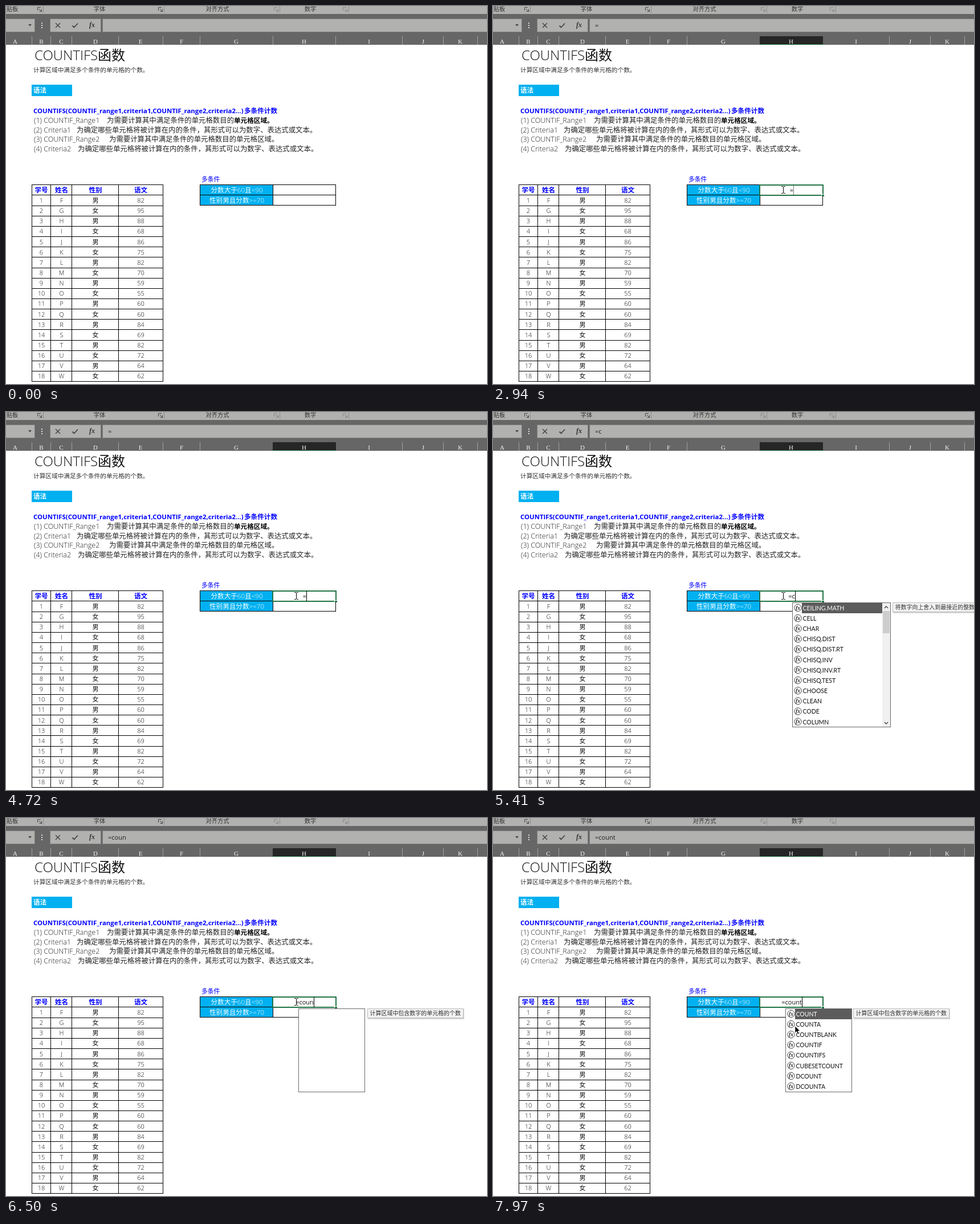
These frames come from a looping animation (844 px wide and 663 px high, 8 s). An HTML page with a canvas:

```html
<!DOCTYPE html>
<html lang="zh-CN">
<head>
<meta charset="utf-8">
<title>COUNTIFS</title>
<style>
html, body { margin: 0; width: 100%; height: 100%; overflow: hidden; background: #fff; }
canvas { display: block; width: 844px; height: 663px; }
</style>
</head>
<body>
<canvas id="stage" width="844" height="663"></canvas>
<script>
const ctx = document.getElementById('stage').getContext('2d');
const LOOP = 8000, ROW = 18.15;
const CJK = '"Noto Sans CJK SC", "Noto Sans CJK", sans-serif';
const SANS = '"Open Sans", ' + CJK;
const LIST = 'Lato, ' + CJK;
const SERIF = '"Liberation Serif", serif';
const BLUE = '#0000ff', CYAN = '#00b0f0', BAR = '#b1b1af', DARK = '#666666', GREEN = '#217346';
const TEAL = '#2cc3c6', PALE = '#74d6d8';

const COLS = [45, 78, 115, 197, 275, 340, 468, 578, 695, 767, 827];
const COL_X = [16, 62, 97, 157, 236, 308, 404, 523, 637, 732, 797];
const SCORES = [82, 95, 88, 68, 86, 75, 82, 70, 59, 55, 60, 60, 84, 69, 82, 72, 64, 62];
const COUNT_TIP = '计算区域中包含数字的单元格的个数';
const COUNT_LIST = 'COUNT COUNTA COUNTBLANK COUNTIF COUNTIFS CUBESETCOUNT DCOUNT DCOUNTA';

// Each menu: start time, left, right, items, thumb bottom (0 = no scrollbar), tip left, tip width, tip
const MENUS = [
  [5410, 525, 698, 'CEILING.MATH CELL CHAR CHISQ.DIST CHISQ.DIST.RT CHISQ.INV CHISQ.INV.RT CHISQ.TEST CHOOSE CLEAN CODE COLUMN',
    388, 701, 270, '将数字向上舍入到最接近的整数或最接近的指定基数的倍数'],
  [5570, 521, 674, 'CODE COLUMN COLUMNS COMBIN COMBINA COMPLEX CONCATENATE CONFIDENCE.NORM CONFIDENCE.T CONVERT CORREL COS',
    425, 677, 270, '返回文本字符串中第一个字符在本机所用字符集中的数字代码'],
  [5890, 518, 648, 'COUNT COUNTA COUNTBLANK COUNTIF COUNTIFS COUPDAYBS COUPDAYS COUPDAYSNC COUPNCD COUPNUM COUPPCD CUBESETCOUNT',
    511, 651, 169, COUNT_TIP],
  [6200, 515, 631, COUNT_LIST, 0, 634, 169, COUNT_TIP],
  [6500, 513, 630, '', 0, 634, 169, COUNT_TIP],
  [6580, 513, 630, COUNT_LIST, 0, 632, 169, COUNT_TIP]
];
const TYPED = [[0, ''], [2470, '='], [5410, '=c'], [5570, '=co'], [5890, '=cou'], [6200, '=coun'], [6580, '=count']];
const CARET = [[0, 0], [1300, 1], [1770, .5], [1850, 0], [2310, .5], [2390, 1], [2940, .5], [3010, 0], [3490, 1],
  [4020, .5], [4100, 0], [4350, .5], [4420, 1], [5110, .6], [5185, .3], [5260, 0], [5410, 1],
  [6960, .6], [7040, .3], [7110, 0], [7510, .5], [7590, 1]];
const MOUSE = [[820, 513, 330], [850, 512, 341], [1000, 512, 336], [1075, 512, 328], [1150, 512, 322],
  [1300, 509, 322], [7190, 510, 323], [7670, 519, 343], [7750, 523, 352], [7820, 526, 360], [7970, 530, 365]];

const latest = (keys, t) => keys.filter(k => k[0] <= t).pop();

function rect(x, y, w, h, color) {
  ctx.fillStyle = color;
  ctx.fillRect(x, y, w, h);
}

function frame(x, y, w, h, color) {
  ctx.strokeStyle = color;
  ctx.lineWidth = 1;
  ctx.strokeRect(x + .5, y + .5, w - 1, h - 1);
}

// y is the middle of the line
function text(s, x, y, size, color = '#222', { weight = 400, font = SANS, align = 'left', style = '' } = {}) {
  ctx.font = `${style} ${weight} ${size}px ${font}`;
  ctx.textAlign = align;
  ctx.fillStyle = color;
  ctx.fillText(s, x, y + size * .37);
}

function path(points, color, width, fill) {
  ctx.beginPath();
  points.forEach(([x, y]) => ctx.lineTo(x, y));
  if (fill) {
    ctx.closePath();
    ctx.fillStyle = fill;
    ctx.fill();
  }
  if (color) {
    ctx.strokeStyle = color;
    ctx.lineWidth = width;
    ctx.stroke();
  }
}

function disc(x, y, r, color) {
  ctx.beginPath();
  ctx.arc(x, y, r, 0, 7);
  ctx.fillStyle = color;
  ctx.fill();
}

function ring(x, y, r, color) {
  ctx.beginPath();
  ctx.arc(x, y, r, 0, 7);
  ctx.strokeStyle = color;
  ctx.lineWidth = 1;
  ctx.stroke();
}

function launcher(x, color) {
  path([[x - 3.5, 8], [x - 3.5, 2.5], [x + 2, 2.5]], color, 1);
  path([[x - 1, 5], [x + 3, 9]], color, 1);
  path([[x + 3.5, 5.5], [x + 3.5, 9.5], [x - .5, 9.5]], color, 1);
}

function ribbon(editing, formula) {
  rect(0, 0, 844, 68, DARK);
  rect(0, 0, 844, 14, BAR);
  const o = { align: 'center' };
  text('贴板', 11, 5, 10.3, '#333', o);
  text('字体', 164, 5, 10.3, '#333', o);
  text('对齐方式', 371, 5, 10.3, '#333', o);
  text('数字', 534, 5, 10.3, '#333', o);
  [65, 277, 480, 601].forEach((x, i) => {
    rect(x, 0, 1, 12, '#8c8c8c');
    launcher(x - 6, i < 2 ? '#444' : '#858585');
  });

  [[-1, 52], [77, 90], [169, 680]].forEach(([x, w]) => {
    rect(x, 22, w, 24, BAR);
    frame(x, 22, w, 24, '#7d7d7d');
  });
  path([[39, 32], [45, 32], [42, 35.5]], null, 0, '#444');
  [30, 34, 38].forEach(y => rect(62, y - 1, 2, 2, '#ddd'));
  path([[87, 30], [95, 38]], '#444', 1.5);
  path([[95, 30], [87, 38]], '#444', 1.5);
  path([[116.5, 34.5], [119.5, 37.5], [126, 30.5]], '#444', 1.8);
  text('fx', 151, 33, 12, '#333', { font: SERIF, style: 'italic', weight: 700, align: 'center' });
  text(formula, 179, 34, 11, '#222');

  COLS.forEach(x => rect(x, 53, 1, 15, '#a0a0a0'));
  if (editing) {
    rect(468, 53, 111, 15, '#262626');
    rect(468, 67, 111, 1, GREEN);
  }
  COL_X.forEach((x, i) => text('ABCDEFGHIJK'[i], x, 62, 11, '#f4f4f4', { font: SERIF, align: 'center' }));
}

function notes() {
  const light = { weight: 300 }, bold = { weight: 700 };
  text('COUNTIFS函数', 50, 86, 24, '#111', light);
  text('计算区域中满足多个条件的单元格的个数。', 48, 112, 10.67, '#333', light);
  rect(45, 138, 71, 20, CYAN);
  text('语法', 48, 148, 11.6, '#fff', bold);
  text('COUNTIFS(COUNTIF_range1,criteria1,COUNTIF_range2,criteria2...)', 48, 184, 11.4, BLUE, bold);
  text('多条件计数', 418, 184, 11.6, BLUE, bold);

  const range = '为需要计算其中满足条件的单元格数目的';
  const rule = '为确定哪些单元格将被计算在内的条件，其形式可以为数字、表达式或文本。';
  [['COUNTIF_Range1', 177, range], ['Criteria1', 124, rule],
   ['COUNTIF_Range2', 181, range + '单元格区域。'], ['Criteria2', 126, rule]].forEach(([name, x, s], i) => {
    const y = 200.5 + i * 16.5;
    text(`(${i + 1}) ${name}`, 49, y, 12.5, '#222', light);
    text(s, x, y, 12.4, '#222', light);
  });
  text('单元格区域。', 400, 200.5, 11.6, '#000', bold);
}

function tables() {
  const mid = { align: 'center', weight: 300 }, head = { align: 'center', weight: 700 };
  const xs = [62, 97.5, 157, 236.5];
  for (let i = 0; i < 20; i++) rect(45, Math.round(313.3 + i * ROW), 231, 1, '#000');
  COLS.slice(0, 5).forEach(x => rect(x, 313, 1, 346, '#000'));
  ['学号', '姓名', '性别', '语文'].forEach((s, i) => text(s, xs[i], 323, 11.6, BLUE, head));
  SCORES.forEach((score, i) => {
    const cells = [i + 1, String.fromCharCode(70 + i), '男女'[i % 2], score];
    cells.forEach((s, k) => text(s, xs[k], 341 + i * 18.13, 11, '#111', mid));
  });

  text('多条件', 343, 304.5, 10.8, BLUE, { weight: 300 });
  rect(340, 313, 128, 37, CYAN);
  [313, 331, 349].forEach(y => rect(340, y, 239, 1, '#000'));
  [340, 468, 578].forEach(x => rect(x, 313, 1, 37, '#000'));
  text('分数大于60且<90', 405, 323, 11.6, '#fff', mid);
  text('性别男且分数>=70', 405, 341, 11.6, '#fff', mid);
}

function editor(t, formula, ime) {
  rect(467, 313, 113, 20, '#fff');
  ctx.strokeStyle = GREEN;
  ctx.lineWidth = 2;
  ctx.strokeRect(468, 314, 111, 18);
  rect(576, 330, 5, 4, '#fff');
  rect(577, 331, 4, 3, GREEN);
  ctx.font = `400 11px ${SANS}`;
  const w = ctx.measureText(formula).width;
  const x = ime ? 469.5 : 524 - w / 2;
  text(formula, x, 323, 11, '#111');
  ctx.globalAlpha = latest(CARET, t)[1];
  rect(Math.round(x + w), 314, 1, 18, '#000');
  ctx.globalAlpha = 1;
}

function imePanel(t) {
  ctx.save();
  ctx.shadowColor = 'rgba(60,190,195,.5)';
  ctx.shadowBlur = 5;
  ctx.shadowOffsetY = 1;
  ctx.beginPath();
  ctx.roundRect(480, 354, 241, 49, 7);
  ctx.fillStyle = '#fff';
  ctx.fill();
  ctx.restore();
  text('c', 488, 367, 13, TEAL, { weight: 700 });
  rect(495, 360, 1, 14, '#444');
  if (t >= 4020) {
    ring(553, 366, 5.5, '#f5a58a');
    rect(552.5, 363, 1, 1.2, '#f08060');
    rect(552.5, 365, 1, 4, '#f08060');
    text('工具箱(分号)', 563, 366, 10.7, TEAL);
  }
  rect(488, 376, 217, 1, '#dff4f4');
  ['从', '串', '次', '超', '晨'].forEach((s, i) => {
    const x = 488 + i * 37, color = i ? PALE : '#f2691e';
    text(i + 1 + '.', x, 389, 12.5, color, { font: '"Noto Sans Mono", monospace' });
    text(s, x + 13, 389, 13, color);
  });
  path([[678, 385], [678, 393], [673, 389]], null, 0, '#c4ecec');
  path([[683, 385], [683, 393], [688, 389]], null, 0, TEAL);
  frame(693, 383, 13, 12, PALE);
  path([[696, 388], [702, 388], [699, 391]], null, 0, TEAL);
}

function menu([, left, right, names, thumb, tipX, tipW, tip]) {
  const items = names ? names.split(' ') : [];
  const h = thumb ? 219 : 147, w = right - left;
  const inner = thumb ? right - 15 : right - 1;
  rect(left, 334, w, h, '#fff');
  if (items.length) rect(left + 17, 335, inner - left - 17, 18, '#5c5c5c');
  items.forEach((s, i) => {
    const y = 344 + i * ROW;
    ring(left + 10, y - .5, 6.2, '#444');
    text('fx', left + 10, y - 1, 9.5, '#222', { font: SERIF, style: 'italic', weight: 700, align: 'center' });
    text(s, left + 18.5, y, 10.5, i ? '#111' : '#fff', { font: LIST });
  });
  if (thumb) {
    rect(inner, 335, 14, 217, '#f0f0f0');
    rect(inner + 1, 349, 12, thumb - 349, '#cdcdcd');
    const x = inner + 7;
    path([[x - 3, 344], [x, 341], [x + 3, 344]], '#444', 1.4);
    path([[x - 3, 544], [x, 547], [x + 3, 544]], '#444', 1.4);
  }
  frame(left, 334, w, h, '#6a6a6a');

  rect(tipX + 1, 335, tipW, 18, '#d4d4d4');
  rect(tipX, 334, tipW, 17, '#f2f2f2');
  frame(tipX, 334, tipW, 17, '#bdbdbd');
  text(tip, tipX + 4.5, 342, 9.97, '#333');
}

function cross(x, y) {
  rect(x - 6, y - 2, 13, 5, '#222');
  rect(x - 2, y - 6, 5, 13, '#222');
  rect(x - 5, y - 1, 11, 3, '#fff');
  rect(x - 1, y - 5, 3, 11, '#fff');
}

function beam(x, y) {
  rect(x, y - 5, 1, 11, '#000');
  [-6, 6].forEach(d => {
    rect(x - 3, y + d, 3, 1, '#000');
    rect(x + 1, y + d, 3, 1, '#000');
  });
}

function arrow(x, y) {
  const shape = [[0, 0], [0, 12], [2.8, 9.4], [5, 14.2], [7, 13.3], [4.9, 8.7], [8.6, 8.5]];
  path(shape.map(([a, b]) => [x + a, y + b]), '#fff', .6, '#000');
}

function pointer(t) {
  if (t < 150) return;
  if (t < 820) {
    const p = Math.min(6, Math.floor((t - 150) / 75)) / 6;
    const k = 1 - (1 - p) * (1 - p);
    return cross(Math.round(664 - 149 * k), Math.round(635 - 319 * k));
  }
  const [, x, y] = latest(MOUSE, t);
  if (t < 1300) cross(x, y);
  else if (t < 7670) beam(x, y);
  else arrow(x, y);
}

function draw(t) {
  const editing = t >= 1300, ime = t >= 3490 && t < 4570;
  const formula = latest(TYPED, t)[1];
  rect(0, 0, 844, 663, '#fff');
  ribbon(editing, formula);
  notes();
  tables();
  if (editing) {
    editor(t, formula, ime);
    if (t < 1390) {
      ctx.globalCompositeOperation = 'multiply';
      disc(509, 322.5, 9.5, '#ffff5a');
      ctx.globalCompositeOperation = 'source-over';
    }
  }
  if (ime) imePanel(t);
  const list = latest(MENUS, t);
  if (list) menu(list);
  pointer(t);
}

const start = performance.now();
function tick() {
  draw((performance.now() - start) % LOOP);
  requestAnimationFrame(tick);
}
tick();
</script>
</body>
</html>
```
